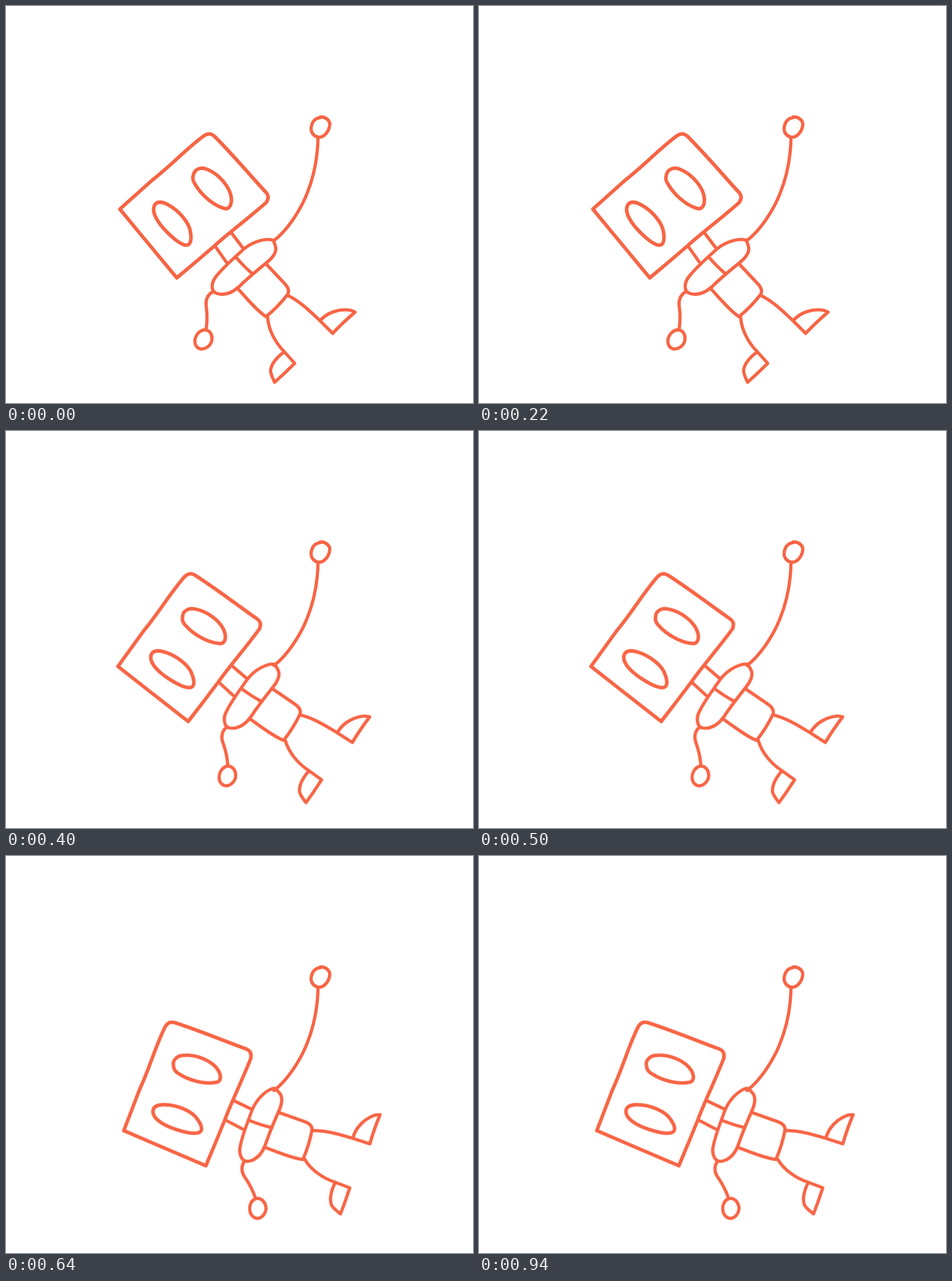
These frames come from a looping animation (812x690 px, 1040 ms). An HTML page:

```html
<!DOCTYPE html>
<html lang="en">
<head>
<meta charset="utf-8">
<title>Waving robot</title>
<style>
  html, body { margin: 0; width: 100%; height: 100%; overflow: hidden; background: #fff; }
  svg { display: block; width: 812px; height: 690px; }
  path { fill: none; stroke: #f76545; stroke-width: 5.6; stroke-linecap: round; stroke-linejoin: round; }
  .head path { stroke-width: 6.2; }
  #body { transform-origin: 466px 407px; }
</style>
</head>
<body>
<svg viewBox="0 0 812 690">
  <g class="raised-arm">
    <path d="M542.5 229C542 262 536 295 523 327C511 357 488 391 466 407.5"/>
    <path d="M546 193C556 192 563 199 563 206C562 218 553 229 543 228C533 226 529 217 531 209C533 200 538 195 546 194"/>
  </g>
  <g id="body">
    <g class="head">
      <path d="M198 353Q226 328 255 302C285 279 318 244 345 225Q355 219 363 227C396 260 426 296 453 325Q459 333 452 342C419 371 384 397 363 416.5Q330 445 297 472.5C270 440 230 392 198 353Z"/>
      <path d="M326 293C328 284 338 279 350 284C370 292 391 315 392 336C392 349 386 355 377 351C358 345 338 326 329 310C324 303 324 298 326 293Z"/>
      <path d="M258 347C262 339 271 340 281 345C300 355 320 377 321 395C323 407 320 415 315 415.5C306 417 291 404 280 393C268 381 252 361 258 347Z"/>
    </g>
    <g class="torso">
      <path d="M364 418L383 445M391 393L413 422M401 438Q414 453 427 464"/>
      <path d="M464 407C452 403 430 409 414 422C400 435 380 452 367 468C356 480 356 495 365 499C378 504 392 499 404 489C420 473 436 460 452 447C466 436 470 428 469 420Q467 411 464 407Z"/>
      <path d="M402 490C418 508 437 530 452 540C468 527 480 514 490 501C493 495 490 488 484 482L452 448"/>
    </g>
    <g class="lowered-arm">
      <path d="M359 497C350 502 347 512 348 520C350 535 350 549 348 562"/>
      <path d="M348 563C356 565 359 573 358 580C357 590 347 597 338 596C330 594 327 586 329 578C332 568 340 562 348 563Z"/>
    </g>
    <g class="legs">
      <path d="M455 541C456 562 468 585 484 601L502 621Q485 638 467 654C464 647 460 640 460 633C462 620 473 609 484 601"/>
      <path d="M490 503C512 514 528 530 546 547L568 569C581 555 594 543 607 532L600 529C580 525 558 533 546 547"/>
    </g>
  </g>
</svg>
<script>
  const LOOP = 1040;

  // Each pose is held until the next one starts: [start ms, dx, dy, degrees]
  const poses = [
    [0, 0, 0, 0],
    [320, 2, -2.2, -12.3],
    [640, 1.9, -4.2, -27.2],
    [LOOP, 0, 0, 0],
  ];

  const frames = poses.map(([start, dx, dy, angle]) => ({
    offset: start / LOOP,
    easing: 'step-end',
    transform: `translate(${dx}px, ${dy}px) rotate(${angle}deg)`,
  }));

  document.getElementById('body').animate(frames, { duration: LOOP, iterations: Infinity });
</script>
</body>
</html>
```
